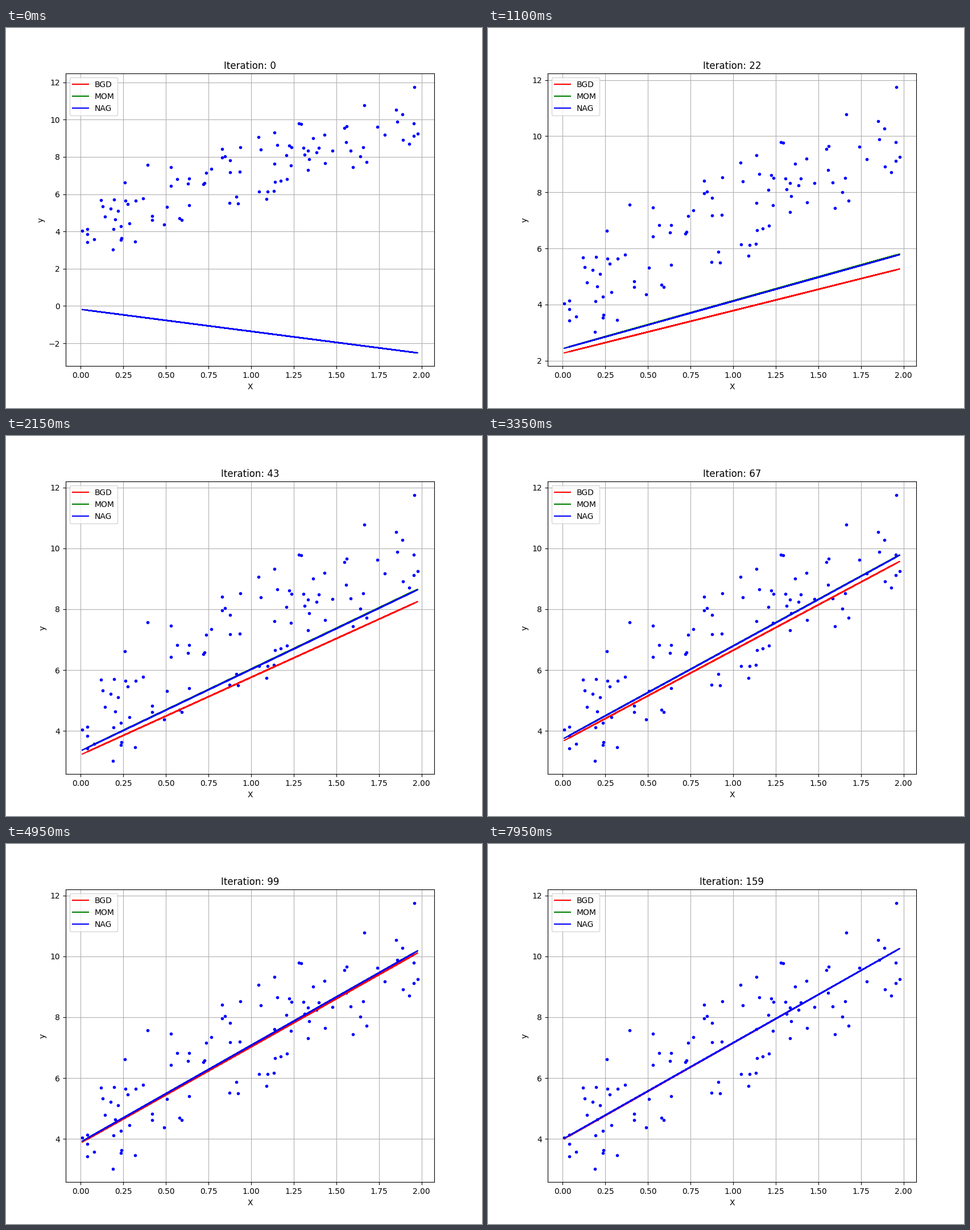
Write a matplotlib script that moves like this. It is 837x669 px and loops after 8 s.

```python
import numpy as np
import matplotlib.pyplot as plt
from matplotlib.animation import FuncAnimation

STEPS = 160
RATE = 0.01
GAMMA = 0.1

np.random.seed(0)
X = 2 * np.random.rand(100, 1)
Y = 4 + 3 * X + np.random.randn(100, 1)
A = np.hstack([np.ones_like(X), X])
START = np.random.randn(2, 1)


def gradient(theta):
    return 2 / len(X) * A.T @ (A @ theta - Y)


def descend(gamma, look_ahead=False):
    """Parameters after each update of gradient descent with momentum gamma."""
    theta, v, path = START, np.zeros((2, 1)), []
    for _ in range(STEPS):
        at = theta - gamma * v if look_ahead else theta
        v = gamma * v + RATE * gradient(at)
        theta = theta - v
        path.append(theta)
    return path


methods = [
    ("BGD", "r", descend(0)),
    ("MOM", "g", descend(GAMMA)),
    ("NAG", "b", descend(GAMMA, look_ahead=True)),
]

# the small surplus keeps the pixel size from rounding down
fig, ax = plt.subplots(figsize=(8.37001, 6.69001), dpi=100)
ax.plot(X, Y, "b.")
lines = [ax.plot(X, A @ path[0], color + "-", label=name)[0]
         for name, color, path in methods]
ax.set_xlabel("X")
ax.set_ylabel("y")
ax.grid(True)
ax.legend(loc="upper left")
title = ax.set_title("")


def update(i):
    for line, (_, _, path) in zip(lines, methods):
        line.set_ydata(A @ path[i])
    ax.relim()
    ax.autoscale_view()
    title.set_text(f"Iteration: {i}")
    return lines


anim = FuncAnimation(fig, update, frames=STEPS, interval=50,
                     init_func=lambda: update(0), repeat=True, repeat_delay=0)
plt.show()
```
